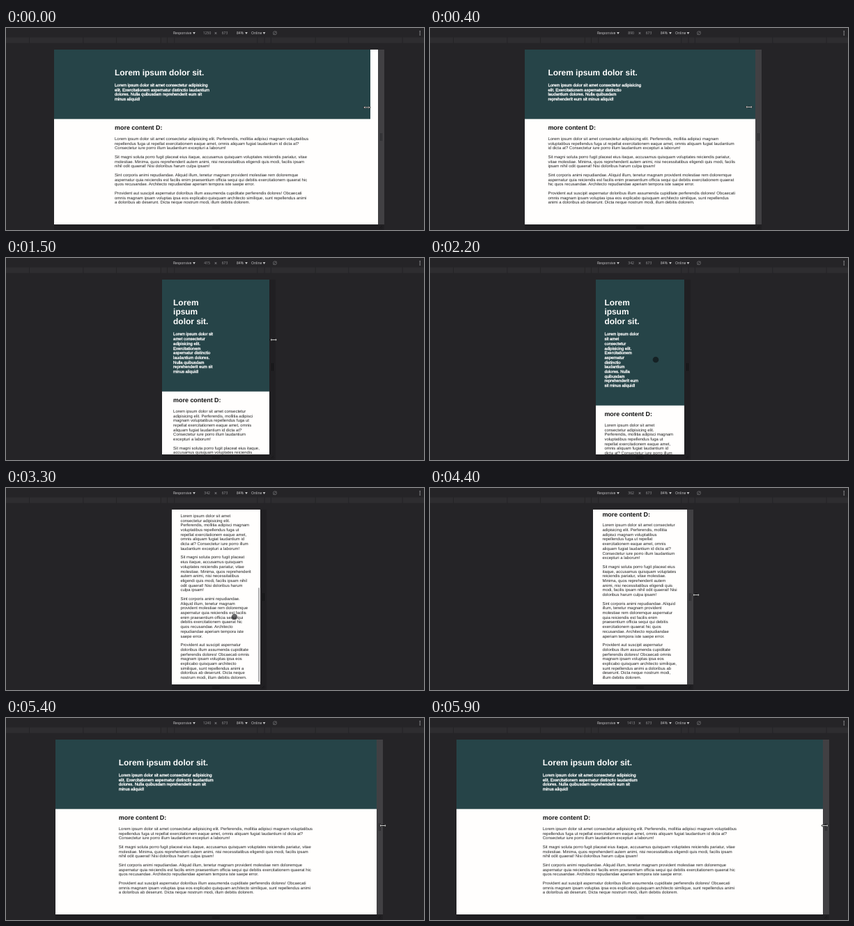
Recreate the animation shown at these times as an HTML page with a canvas. Size 600x290 px, loop 6 s.

```html
<!DOCTYPE html>
<html lang="en">
<head>
<meta charset="utf-8">
<title>Responsive page resize</title>
<style>
html, body { margin: 0; width: 100%; height: 100%; overflow: hidden; background: #252427; }
canvas { display: block; }
</style>
</head>
<body>
<canvas id="stage" width="600" height="290"></canvas>
<script>
const ctx = document.getElementById('stage').getContext('2d');
const LOOP = 6000, STEP = 100;
const ZOOM = 0.372, CENTER = 301.3, TOP = 31, BOTTOM = 282, VIEW_H = 673;
const SANS = '"Liberation Sans", Arial, sans-serif';
const UI_FONT = '"Open Sans", "Noto Sans", sans-serif';

const TITLE = 'Lorem ipsum dolor sit.';
const INTRO = 'Lorem ipsum dolor sit amet consectetur adipisicing elit. Exercitationem aspernatur distinctio laudantium dolores. Nulla quibusdam reprehenderit eum sit minus aliquid!';
const HEADING = 'more content D:';
const BODY = [
  'Lorem ipsum dolor sit amet consectetur adipisicing elit. Perferendis, mollitia adipisci magnam voluptatibus repellendus fuga ut repellat exercitationem eaque amet, omnis aliquam fugiat laudantium id dicta at? Consectetur iure porro illum laudantium excepturi a laborum!',
  'Sit magni soluta porro fugit placeat eius itaque, accusamus quisquam voluptates reiciendis pariatur, vitae molestiae. Minima, quos reprehenderit autem animi, nisi necessitatibus eligendi quis modi, facilis ipsam nihil odit quaerat! Nisi doloribus harum culpa ipsam!',
  'Sint corporis animi repudiandae. Aliquid illum, tenetur magnam provident molestiae rem doloremque aspernatur quia reiciendis est facilis enim praesentium officia sequi qui debitis exercitationem quaerat hic quos recusandae. Architecto repudiandae aperiam tempora iste saepe error.',
  'Provident aut suscipit aspernatur doloribus illum assumenda cupiditate perferendis dolores! Obcaecati omnis magnam ipsam voluptas ipsa eos explicabo quisquam architecto similique, sunt repellendus animi a doloribus ab deserunt. Dicta neque nostrum modi, illum debitis dolorem.'
];

const STYLES = {
  h1: { font: 'bold 32px ' + SANS, line: 37, base: 29, margin: 21.44, color: '#fff' },
  h2: { font: 'bold 24px ' + SANS, line: 27, base: 22, margin: 19.92, color: '#111' },
  intro: { font: '16px ' + SANS, line: 18, base: 14.5, margin: 16, color: '#fff', heavy: true },
  p: { font: '16px ' + SANS, line: 18, base: 14.5, margin: 16, color: '#222' }
};

// Keys: [time, value, ...]
const WIDTH = [[0, 1250], [700, 620], [800, 535], [1000, 487], [1400, 431], [1800, 365],
  [2100, 342], [4300, 342], [4450, 372], [4600, 480], [4800, 752], [4900, 931],
  [5100, 1130], [5400, 1240], [5600, 1329], [5900, 1413]];
// How far the page layout differs from the viewport while it shrinks
const LAG = [[0, -31], [100, 15], [1400, 15], [2000, 0]];
const POINTER = [[0, 518, 114], [700, 413, 113], [800, 400, 113], [1400, 387, 115],
  [2100, 367, 132], [2200, 324, 146], [2700, 325, 165], [3300, 328, 185], [3500, 341, 180],
  [4000, 366, 157], [4300, 370, 154], [4500, 394, 153], [4800, 466.5, 153], [4900, 492, 153],
  [5100, 523, 154], [5400, 541, 154.5], [5600, 557, 154.5], [5900, 567, 154.5]];

function track(keys, t, field = 1) {
  let i = 0;
  while (i < keys.length - 2 && keys[i + 1][0] <= t) i++;
  const a = keys[i], b = keys[i + 1];
  const k = Math.min(1, (t - a[0]) / (b[0] - a[0]));
  return a[field] + (b[field] - a[field]) * k;
}

function smooth(t, from, to) {
  const k = Math.max(0, Math.min(1, (t - from) / (to - from)));
  return k * k * (3 - 2 * k);
}

function rect(x, y, w, h, color) {
  ctx.fillStyle = color;
  ctx.fillRect(x, y, w, h);
}

function edges(width) {
  const half = width * ZOOM / 2;
  return [Math.round(CENTER - half), Math.round(CENTER + half)];
}

function wrap(text, maxWidth) {
  const lines = [];
  let line = '';
  for (const word of text.split(' ')) {
    const longer = line ? line + ' ' + word : word;
    if (line && ctx.measureText(longer).width > maxWidth) {
      lines.push(line);
      line = word;
    } else line = longer;
  }
  return [...lines, line];
}

function layout(pageWidth) {
  const width = Math.min(pageWidth * 0.8, 750);
  const x = (pageWidth - width) / 2;
  const items = [];
  let y = 48, lastMargin = 0;
  function block(text, style, maxWidth) {
    ctx.font = style.font;
    y += Math.max(lastMargin, style.margin);
    for (const line of wrap(text, maxWidth)) {
      items.push({ line, x, y: y + style.base, style });
      y += style.line;
    }
    lastMargin = style.margin;
  }
  block(TITLE, STYLES.h1, width / 2);
  block(INTRO, STYLES.intro, width / 2);
  const header = y += 16 + 48 + 4;
  lastMargin = 0;
  block(HEADING, STYLES.h2, width);
  for (const text of BODY) block(text, STYLES.p, width);
  return { items, header, height: y + 16 };
}

function drawLine({ line, x, y, style }) {
  ctx.font = style.font;
  ctx.fillStyle = ctx.strokeStyle = style.color;
  ctx.fillText(line, x, y);
  if (style.heavy) {
    ctx.lineWidth = 0.8;
    ctx.strokeText(line, x, y);
  }
}

function drawPage(t, width) {
  const [left, right] = edges(width);
  const pageWidth = width + track(LAG, t);
  ctx.save();
  ctx.beginPath();
  ctx.rect(left, TOP, right - left, BOTTOM - TOP);
  ctx.clip();
  rect(left, TOP, right - left, BOTTOM - TOP, '#fffefd');
  ctx.translate(CENTER - width * ZOOM / 2, TOP);
  ctx.scale(ZOOM, ZOOM);
  ctx.textRendering = 'geometricPrecision';
  const page = layout(pageWidth);
  const maxScroll = Math.max(0, page.height - VIEW_H);
  const scroll = maxScroll * smooth(t, 2200, 3250);
  ctx.save();
  ctx.translate(0, -scroll);
  rect(-2, 0, pageWidth + 4, page.header, '#264448');
  page.items.forEach(drawLine);
  ctx.restore();
  if (t > 2200 && t < 3800) {
    const ratio = VIEW_H / page.height;
    rect(width - 7, scroll * ratio + 3, 4, VIEW_H * ratio - 12, 'rgba(110,110,112,.75)');
  }
  ctx.restore();
}

function drawHandles(t, width) {
  const [left, right] = edges(width);
  const lit = t < 500 || (t >= 1900 && t < 2200) || t >= 4000;
  const grip = lit ? '#242427' : '#101012';
  rect(left, BOTTOM, right - left + 9, 290 - BOTTOM, '#201f22');
  rect(right, TOP, 9, BOTTOM - TOP, lit ? '#414043' : '#201f22');
  rect(right + 3, 151, 0.8, 11, grip);
  rect(right + 5, 151, 0.8, 11, grip);
  rect(CENTER - 5.5, 285, 11, 0.7, '#101012');
  rect(CENTER - 5.5, 287, 11, 0.7, '#101012');
  ctx.strokeStyle = '#111113';
  ctx.lineWidth = 0.6;
  ctx.beginPath();
  ctx.moveTo(right + 2, 288);
  ctx.lineTo(right + 6, 284);
  ctx.moveTo(right + 4.5, 288);
  ctx.lineTo(right + 6, 286.5);
  ctx.stroke();
}

function label(text, x, color, align = 'left', size = 5) {
  ctx.font = size + 'px ' + UI_FONT;
  ctx.textAlign = align;
  ctx.fillStyle = color;
  ctx.fillText(text, x, 7.5 + size * 0.36);
  ctx.textAlign = 'left';
}

function caret(x) {
  ctx.fillStyle = '#c8c8ca';
  ctx.beginPath();
  ctx.moveTo(x - 1.8, 6);
  ctx.lineTo(x + 1.8, 6);
  ctx.lineTo(x, 9);
  ctx.fill();
}

function drawToolbar(width) {
  rect(0, 13.5, 600, 8, '#2e2d30');
  for (const size of [320, 375, 425, 768, 1024, 1440])
    for (const side of [-1, 1])
      rect(CENTER + side * size * ZOOM / 2 - 0.4, 13.5, 0.8, 8, '#222124');
  label('Responsive', 240, '#cfcfd1');
  caret(270);
  label(String(Math.round(width)), 288.6, '#98989b', 'center');
  label('×', 301, '#a8a8ab', 'center', 7);
  label('673', 314, '#98989b', 'center');
  label('84%', 331, '#cfcfd1');
  caret(345);
  label('Online', 352, '#cfcfd1');
  caret(370.5);
  ctx.strokeStyle = '#77777a';
  ctx.lineWidth = 0.7;
  ctx.beginPath();
  ctx.arc(386, 7.2, 2.5, 0, Math.PI * 2);
  ctx.moveTo(383.6, 9.6);
  ctx.lineTo(388.4, 4.8);
  ctx.stroke();
  for (const y of [4.7, 7.2, 9.7]) rect(593.6, y - 0.6, 1.3, 1.3, '#b5b5b8');
}

function resizeArrow(x, y) {
  ctx.beginPath();
  ctx.moveTo(x - 3.5, y);
  ctx.lineTo(x + 3.5, y);
  for (const side of [-1, 1]) {
    ctx.moveTo(x + side * 2.8, y - 1.2);
    ctx.lineTo(x + side * 4.2, y);
    ctx.lineTo(x + side * 2.8, y + 1.2);
  }
}

function drawPointer(t) {
  const x = track(POINTER, t), y = track(POINTER, t, 2);
  if (t >= 2200 && t < 4000) {
    ctx.fillStyle = 'rgba(10,10,14,.6)';
    ctx.beginPath();
    ctx.arc(x, y, 4.3, 0, Math.PI * 2);
    ctx.fill();
    return;
  }
  for (const [color, weight] of [['#111', 1.8], ['#fff', 0.8]]) {
    resizeArrow(x, y);
    ctx.strokeStyle = color;
    ctx.lineWidth = weight;
    ctx.stroke();
  }
}

function draw(now) {
  const t = Math.floor((now % LOOP) / STEP) * STEP;
  const width = track(WIDTH, t);
  rect(0, 0, 600, 290, '#252427');
  drawToolbar(width);
  drawHandles(t, width);
  drawPage(t, width);
  drawPointer(t);
}

const start = performance.now();
function tick() {
  draw(performance.now() - start);
  requestAnimationFrame(tick);
}
tick();
</script>
</body>
</html>
```
